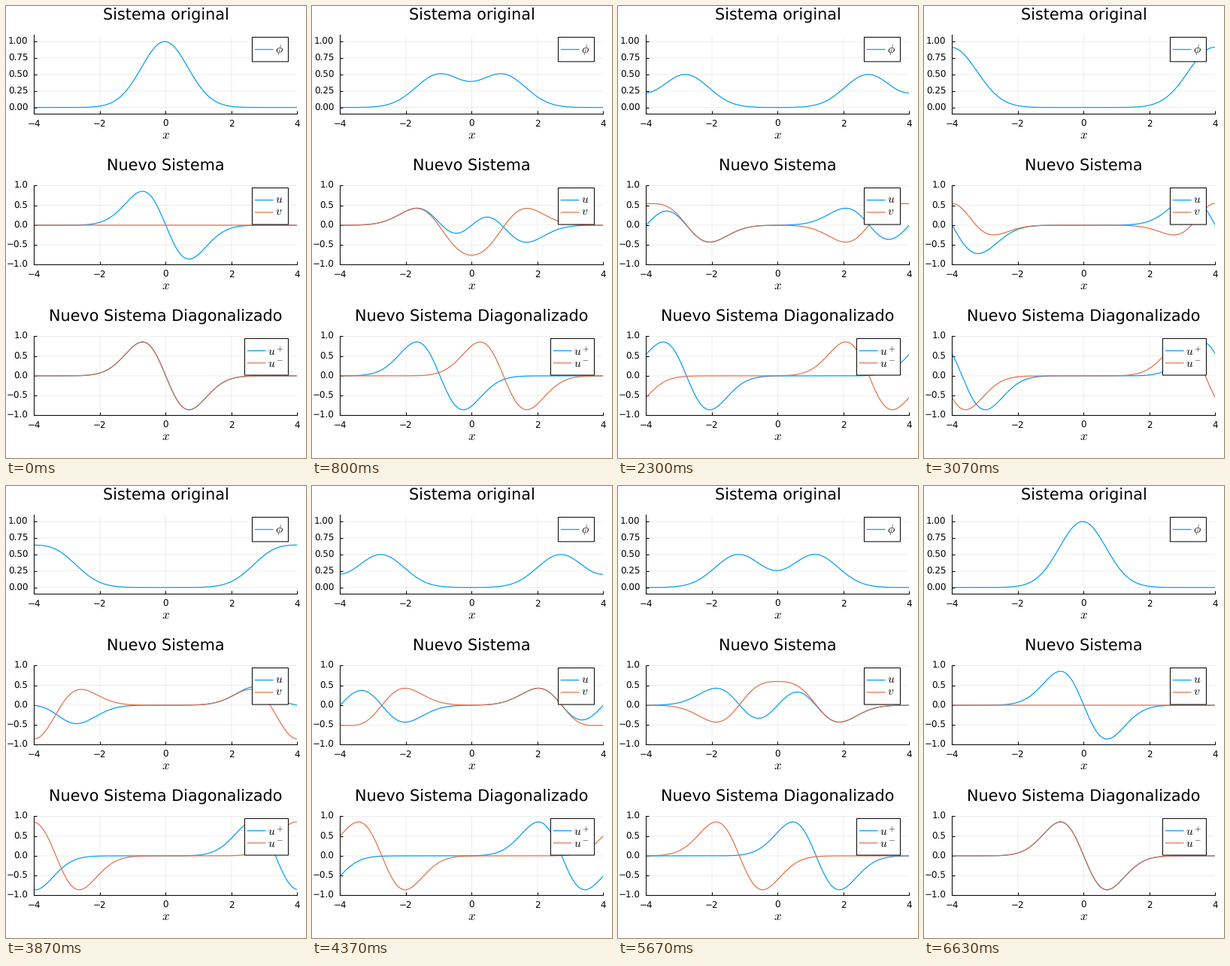
Animation of 399 by 600 pixels, one loop 6.66 s. Source, as a matplotlib script:

```python
import numpy as np
import matplotlib.pyplot as plt
from matplotlib.animation import FuncAnimation
from matplotlib.lines import Line2D
from matplotlib.patches import Rectangle

W, H, DPI = 399, 600, 100
PX = 72 / DPI  # points per pixel
FRAMES, LOOP_MS = 200, 6660
BLUE, ORANGE = "#009AFA", "#E26F46"
LEFT, RIGHT, PANEL_H = 37.45, 387.45, 105
ROW = 16.2  # legend row height

plt.rcParams.update({
    "font.family": "DejaVu Sans",
    "mathtext.fontset": "cm",
    "text.hinting": "none",
    "path.snap": False,
})

fig = plt.figure(figsize=(W / DPI, H / DPI), dpi=DPI, facecolor="white")
x = np.linspace(-4, 4, 129)
dx = x[1] - x[0]


def label(px, py, s, size, ha="center"):
    fig.text(px / W, 1 - py / H, s, size=size * PX, ha=ha,
             va="baseline", zorder=3)


def legend(left, top, names):
    """Boxed key, with pixel coordinates measured from the top left."""
    height = ROW * (len(names) + 1)
    fig.add_artist(Rectangle(
        (left / W, 1 - (top + height) / H), (375.45 - left) / W, height / H,
        transform=fig.transFigure, fc="white", ec="black", lw=PX,
        snap=True, zorder=1))
    for i, (name, color) in enumerate(zip(names, (BLUE, ORANGE))):
        y = top + ROW * (i + 1)
        fig.add_artist(Line2D(
            [(left + 4) / W, (left + 27.5) / W], [1 - y / H] * 2,
            transform=fig.transFigure, color=color, lw=1.2 * PX, zorder=2))
        drop = 6 if "^" in name else 4.2
        label(left + 31, y + drop, f"${name}$", 15.5, "left")


def panel(top, title, ylim, yticks, digits, names, box_left):
    ax = fig.add_axes([LEFT / W, 1 - (top + PANEL_H) / H,
                       (RIGHT - LEFT) / W, PANEL_H / H])
    ax.set(xlim=(-4, 4), ylim=ylim)
    ax.set_axisbelow(True)
    ax.spines[["top", "right"]].set_visible(False)
    for side in ("left", "bottom"):
        ax.spines[side].set_linewidth(PX)

    xticks = range(-4, 5, 2)
    ax.set_xticks(xticks, [])
    ax.set_yticks(yticks, [])
    ax.tick_params(direction="in", length=4 * PX, width=PX)
    ax.grid(color="black", alpha=0.1, lw=0.7 * PX)
    for t in xticks:
        px = LEFT + (RIGHT - LEFT) * (t + 4) / 8
        label(px, top + PANEL_H + 16.2, str(t).replace("-", "\u2212"), 11.9)
    for t in yticks:
        py = top + PANEL_H * (ylim[1] - t) / (ylim[1] - ylim[0])
        text = f"{t:.{digits}f}".replace("-", "\u2212")
        label(29.45, py + 3.85, text, 11.9, "right")

    label(212.5, top - 20.1, title, 20.8)
    label(212, top + 137.5, "$x$", 17)
    legend(box_left, top + 3, names)
    return [ax.plot(x, 0 * x, color=c, lw=1.2 * PX)[0]
            for c, _ in zip((BLUE, ORANGE), names)]


halves = np.linspace(-1, 1, 5)
phi_line, = panel(38.45, "Sistema original", (-0.1, 1.1),
                  np.linspace(0, 1, 5), 2, [r"\phi"], 327.45)
u_line, v_line = panel(238.45, "Nuevo Sistema", (-1, 1),
                       halves, 1, ["u", "v"], 327.45)
plus_line, minus_line = panel(438.45, "Nuevo Sistema Diagonalizado", (-1, 1),
                              halves, 1, ["u^+", "u^-"], 317.45)


def slope(s):
    """Derivative of a Gaussian pulse on the periodic domain."""
    s = (s + 4) % 8 - 4
    return -2 * s * np.exp(-s ** 2)


def update(i):
    # The pulse splits in two and crosses the periodic domain once
    shift = 8 * i / (FRAMES - 1)
    plus, minus = slope(x + shift), slope(x - shift)
    u, v = (plus + minus) / 2, (plus - minus) / 2
    # phi is the running sum of u, lifted so that its minimum is zero
    phi = np.cumsum(u) * dx
    phi_line.set_ydata(phi - phi.min())
    u_line.set_ydata(u)
    v_line.set_ydata(v)
    plus_line.set_ydata(plus)
    minus_line.set_ydata(minus)
    return phi_line, u_line, v_line, plus_line, minus_line


anim = FuncAnimation(fig, update, frames=FRAMES, interval=LOOP_MS / FRAMES,
                     repeat=True, repeat_delay=0, blit=False)
plt.show()
```
